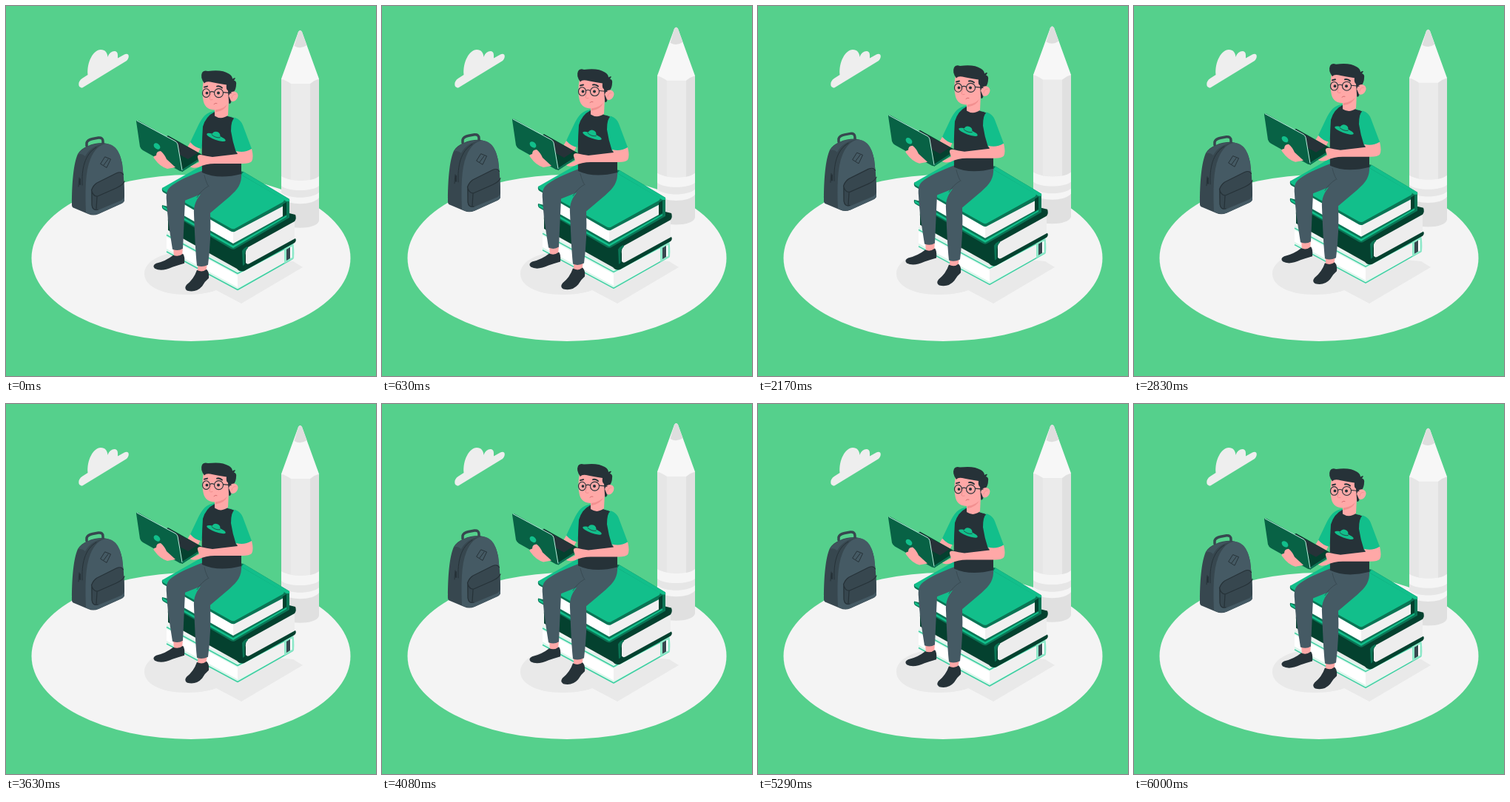
Animation of 500 by 500 pixels, one loop 6.04 s. Source, as an HTML page:

```html
<!DOCTYPE html>
<html lang="en">
<head>
<meta charset="utf-8">
<title>Reading on a stack of books</title>
<style>
html, body { margin: 0; height: 100%; overflow: hidden; background: #55d08c; }
svg { display: block; width: 100vw; height: 100vh; }
.ink { fill: #263238; }
.slate { fill: #455a64; }
.navy { fill: #37474f; }
.skin { fill: #ffa8a7; }
.green { fill: #12bf8b; }
.deep { fill: #0a7555; }
.forest { fill: #04412f; }
.pale { fill: #dcf6ec; }
.mint { fill: #8ee8c9; }
.white { fill: #fff; }
.shade { fill: #e9e9e9; }
.line { fill: none; stroke: #263238; stroke-linecap: round; stroke-linejoin: round; }
.rim { fill: none; stroke: #3fcfa2; stroke-width: 1.5; stroke-linejoin: round; }
</style>
</head>
<body>
<svg viewBox="0 0 500 500">
  <ellipse cx="250" cy="340.5" rx="215.500" ry="112.5" fill="#f4f4f4"/>
  <path class="shade" d="M187 362C187 345 210 332 245 332L388 345L401 353L318 402L284 384C272 389 255 390 242 390C210 390 187 378 187 362Z"/>
  <path fill="#eee" d="M101 110Q97.500 109 98.500 103.500Q100 99 105 96.500L110.500 93C109 76 118 59 128 59C134 59 137 63 137.500 69C140 60 151 58 151 66V70.500L160 65.500C166 62.500 168 69 163 74L104 110Q102 111 101 110Z"/>

  <g id="pencil">
    <path fill="#e0e0e0" d="M372 255H423V290C421 303 374 303 372 290Z"/>
    <path fill="#f5f5f5" d="M372 228H423V259C415 270 380 270 372 259Z"/>
    <path fill="#e6e6e6" d="M372 243C381 251 414 251 423 243V252C414 261 381 261 372 252Z"/>
    <path fill="#e6e6e6" d="M372 98H386V235Q377 233 372 230Z"/>
    <path fill="#ebebeb" d="M385 100H411V235Q398 237 385 235Z"/>
    <path fill="#e0e0e0" d="M411 100L423 98V230Q418 234 411 235Z"/>
    <path fill="#f7f7f7" d="M395 35Q397.500 31 400 35L423 98.500Q417 100 411 105H385Q378 100 372 98.500Z"/>
    <path fill="#dedede" d="M395 35Q397.500 31 400 35L406.500 53Q398 59 389.500 54Z"/>
  </g>

  <g id="bag">
    <path class="line" stroke-width="3.500" style="stroke:#37474f" d="M109 189V185Q110 181 117 179.500L125 178Q131 177.500 131 183V187"/>
    <path class="navy" d="M89 269C89 240 91 214 97 200C102 191 117 185 130 185C146 186 154 196 157 213C159 230 160 247 160 262Q160 265 156 267L125 281Q118 284 111 281L92 273Q89 272 89 269Z"/>
    <path class="slate" d="M108 279C107 250 107 224 114 207C119 194 127 187 135 186C149 187 154 198 157 213C159 230 160 247 160 262Q160 265 156 267L125 281Q116 284 108 279Z"/>
    <path class="slate" d="M97 201C103 191 118 185 132 186C120 188 112 194 107 203C102 199 99 200 97 201Z" opacity=".7"/>
    <path class="line" stroke-width="1" d="M103 242C102 221 106 200 122 191M99 232L98 244"/>
    <path class="line" stroke-width="2" d="M100 234V241"/>
    <path class="line" stroke-width="1" d="M134 204L141.500 207L136 218.500L128 213.500ZM138 207L132 215"/>
    <path class="navy" d="M115 250Q116 243 122 240L149 226Q158 224 159 232L160 257Q159 261 155 263L124 276Q117 277 116 271Z"/>
    <path class="line" stroke-width="1.200" d="M160 237Q158 242 149 246L124 257Q118 258 115.500 249Q118 242 123 239L149 226Q156 223 158.500 228M116 251V269Q117 277 124 275M123 258L122 274"/>
  </g>

  <g id="reader">
    <g id="bottomBook">
      <path class="pale" d="M217 306L313 358L388 319V341L313 384.500L217 332Z"/>
      <path class="white" d="M217 312L313 364L377 330V347L313 380L217 328Z"/>
      <path fill="#f0f0f0" d="M313 364L377 330V347L313 380Z"/>
      <path class="rim" d="M217 309.500L313 361.500L388 322M217 332L313 383.500L388 341"/>
      <path class="mint" d="M376 326L388 319.500Q390 328 389 341L376 348Z"/>
      <path class="navy" d="M379 329L384 326V341L379 344Z"/>
      <path class="white" d="M384 326L386.500 325V340L384 341Z"/>
    </g>
    <g id="middleBook">
      <path class="forest" d="M219 283L320 328V358L222 304Q218 295 219 283Z"/>
      <path fill="#ededed" d="M324 326L390 291V316L324 350Z"/>
      <path class="forest" d="M219 280L300 260L391 282Q393 287 390 291L327 326Q323 330 324 337V347Q326 350 329 348L391 314Q393 317 390 320L322 358Q316 360 312 355L219 303Z"/>
      <path class="deep" d="M319 331Q321 327 326 325L327 327Q322 331 322.500 338V349L320 351Z"/>
    </g>
    <g id="topBook">
      <path class="white" d="M214 250L307 303L376 266V289L307 328L219 277Z"/>
      <path fill="#f0f0f0" d="M307 304L375 267V287L307 326Z"/>
      <path class="deep" d="M211 269L219 271L307 321L374 284V264L383 261V286L309 328.500Q306 329.500 303 327.500L213 275Q210 273 211 269Z"/>
      <path class="green" d="M212 270L307 324L379 283V285L307 327L212 273Z"/>
      <path class="deep" d="M211 246L300 220L321 224L383 261Q384 265 381 267L309 305Q306 306 303 304L213 252Q210 250 211 246Z"/>
      <path class="green" d="M211 246L290 201L318 228L373 260Q378 262 374 265L309 301Q306 302 303 300L212 249Z"/>
      <path class="green" d="M321 224L383 261V264L379 264L318 228Z"/>
      <path class="forest" d="M374 268L379 265V282L374 285Z"/>
    </g>

    <g id="legs" transform="translate(0 .7)">
      <path class="skin" d="M226 326L239 325L238 338L227 338Z"/>
      <path class="ink" d="M226 336Q233 339 239 334Q242 337 241 347Q234 349 225 352Q210 359 201 354Q197 350 203 347Q216 344 226 336Z"/>
      <path class="slate" d="M272 219C255 226 236 233 224 242C217 247 216 253 217 263C218 285 222 308 225 328Q233 331 239 327C240 305 241 282 242 262L285 245L300 222Z"/>
      <path class="skin" d="M259 347L272 347L270 360L259 360Z"/>
      <path class="ink" d="M258 356Q265 360 271 355Q275 359 274 367Q269 371 265 378Q257 387 245 384Q240 381 244 376Q254 368 258 356Z"/>
      <path class="slate" d="M270 222C275 238 272 242 266 250C257 260 253 269 254 281C255 306 256 330 258 350Q265 353 273 349C276 326 277 302 276 279L302 257C313 247 319 240 318 225Z"/>
      <path class="line" stroke-width=".8" style="stroke:#37474f" d="M268 228Q271 240 274 243M273 243Q264 248 258 258"/>
    </g>

    <g id="body" transform="translate(0 1)">
      <path class="skin" d="M251 180L264 188L259 199L246 204L240 198Z"/>
      <path class="green" d="M282 141C271 142 265 149 259 162L249 183Q256 191 264 192L270 165Z"/>
      <path class="ink" d="M282 142Q270 148 266 162Q264 190 265 224Q287 234 318 226V190L316 158Q312 150 300 148Z"/>
      <path class="green" d="M300 148Q316 149 320 160L332 192Q322 199 311 197Q306 182 304 168Q304 153 309 150Z"/>
      <g transform="rotate(20 284 176.500)">
        <ellipse class="green" cx="284" cy="176.500" rx="13.500" ry="3.400"/>
        <ellipse class="green" cx="283" cy="173.500" rx="5.500" ry="4.500"/>
        <path class="line" stroke-width=".7" d="M277 175Q283 178 289 175"/>
      </g>
    </g>

    <g id="laptop">
      <path class="forest" d="M212 179L219 175L267 202V205L238 224L230 215Z"/>
      <path class="ink" d="M214 178L219 176L259 198.500L246 207L235 201L229 188Z"/>
      <path class="deep" d="M238 221L266 203V205L238 224Z"/>
      <path fill="#086245" d="M176 156Q176 154 179 155L229 183Q231 184 232 187L238 222Q238 224 235 223L185 195Q182 193 181 190Z"/>
      <path fill="none" stroke="#b9efdc" stroke-width="1" d="M177 155L229 183Q231 184 232 187L238 222"/>
      <ellipse class="green" cx="204" cy="189.500" rx="5" ry="3.500" transform="rotate(42 204 189.500)"/>
    </g>

    <g class="skin" id="arms">
      <path d="M201 207Q197 203 203 202Q203 196 209 196Q214 200 217 207L229 218L218 220Q208 217 201 207Z"/>
      <path d="M311 196Q322 199 332 193Q335 205 332 210Q329 213 320 213L282 213Q270 213 260 218Q251 220 249 217L261 211L259 205Q258 201 263 201Q271 203 279 204L313 200Z"/>
    </g>

    <g id="head" transform="translate(0 .6)">
      <path class="skin" d="M282 132L301 126L300 147Q291 154 282 148Z"/>
      <path fill="#f28f8f" d="M283 139Q292 139 299 132Q296 141 283 143Z"/>
      <path class="skin" d="M267 99Q264 118 267 129Q270 140 283 140Q297 138 302 128L304 104Q290 94 267 99Z"/>
      <path class="ink" d="M268 104Q262 96 265 89.500Q267 85.500 273 87.500Q292 85 301 91Q306 94 306 98Q309 96 310 97Q309 99 308 100Q312 101 311 106Q311 112 307 117L304 130Q301 134 301 128L300 114Q297 112 298 106Q285 104 276 102Q270 101 268 104Z"/>
      <path class="skin" d="M301 121Q303 114 309 115Q315 117 313 123Q310 130 304 128Z"/>
      <path class="line" stroke-width=".8" style="stroke:#f28f8f" d="M305 124Q306 118 310 119"/>
      <g class="line" stroke-width="1.100">
        <ellipse cx="270.500" cy="117" rx="5" ry="5.800"/>
        <circle cx="287.500" cy="117" r="6"/>
        <path d="M275.500 116Q278 114 281.500 116M293.500 116L304 117"/>
        <path stroke-width="2" d="M268 109L272 108M285 108Q289 107 292 110"/>
      </g>
      <circle class="ink" cx="271.500" cy="117" r="1.900"/>
      <circle class="ink" cx="287" cy="117" r="2"/>
      <path class="line" stroke-width="1" style="stroke:#f28f8f" d="M277 117L275 125Q276 127 279 126"/>
      <path class="line" stroke-width="1" style="stroke:#d96f72" d="M281 132Q283 130 285 131"/>
    </g>
  </g>
</svg>
<script>
const LOOP = 6040, LIFT = 10;
const pencil = document.getElementById("pencil");
const bag = document.getElementById("bag");
const reader = document.getElementById("reader");

// Steady rise and fall: 0 at the ends of a period, LIFT in the middle.
const rise = (t, period) => LIFT * (1 - Math.abs(2 * (t % period) / period - 1));
const lift = (part, y) => part.setAttribute("transform", `translate(0 ${-y})`);

function draw() {
  const t = performance.now() % LOOP;
  const quick = rise(t, LOOP / 2);
  lift(pencil, quick);
  lift(bag, quick);
  lift(reader, rise(t, LOOP));
  requestAnimationFrame(draw);
}
draw();
</script>
</body>
</html>
```
